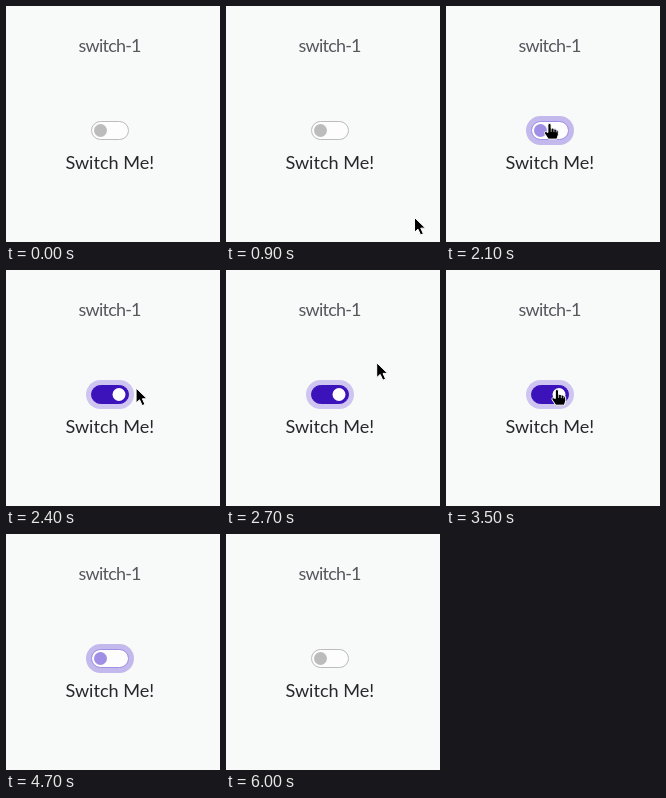
These frames come from a looping animation (214x236 px, 6600 ms). An HTML page:

```html
<!DOCTYPE html>
<html lang="en">
<head>
<meta charset="utf-8">
<title>Switch</title>
<style>
  html, body { margin: 0; width: 100%; height: 100%; overflow: hidden; background: #f8f9f9; }
  svg { display: block; width: 100vw; height: 100vh; }
  text { font-family: Lato, "Open Sans", sans-serif; }
</style>
</head>
<body>
<svg viewBox="0 0 214 236" xmlns="http://www.w3.org/2000/svg">
  <rect width="214" height="236" fill="#f8f9f9"/>
  <text x="72.6" y="45.7" font-size="18" letter-spacing="-0.78" fill="#55575d">switch-1</text>
  <text x="59.4" y="163" font-size="18.1" fill="#28282c">Switch Me!</text>

  <rect id="ring" x="80" y="110" width="48" height="29" rx="14.5"/>
  <rect id="track" x="85.5" y="115.5" width="37" height="18" rx="9"/>
  <circle id="knob" cy="124.5" r="6.5"/>

  <path id="arrow" d="M.7 .7V15.6L4.2 12.4L6.8 18.2L9.6 17L7 11.4H11.7Z"
    fill="#000" stroke="#fff" stroke-linejoin="round"/>
  <g id="hand" stroke="#fff" stroke-linejoin="round">
    <path d="M-1.6 9V1.4Q-1.6 0 0 0T1.6 1.4V5Q3.2 4 4.4 5.6Q6 4.8 6.9 6.5Q8.8 6 8.8 8.4V11.4L7.4 15.6H-1.2L-4.8 10.2Q-5.6 8.6 -4.2 8.2Q-3 8 -1.6 9Z"/>
    <path d="M1.7 5.4V8.4M4.4 6V8.6M6.8 6.8V8.8" stroke-width=".7" fill="none"/>
  </g>
</svg>
<script>
const LOOP = 6600, STEP = 100;
const PRESS = 2100, RELEASE = 4200, BLUR = 5400, FADE = 200;
const el = id => document.getElementById(id);
const ring = el('ring'), track = el('track'), knob = el('knob');
const arrow = el('arrow'), hand = el('hand');

// Each move bends from one point to the next around a control point.
const spot = (x, y) => ({ x, y });
const corner = spot(196, 217), left = spot(103.5, 117.5);
const away = spot(150, 92), right = spot(107, 124), exit = spot(200, 224);
const moves = [
  { start: 800, end: 1500, from: corner, bend: spot(120, 160), to: left },
  { start: 2100, end: 2700, from: left, bend: spot(132, 130), to: away },
  { start: 3000, end: 3700, from: away, bend: spot(114, 114), to: right },
  { start: 4300, end: 4700, from: right, bend: spot(154, 174), to: exit }
];

const GREY = [188, 188, 188], VIOLET = [160, 143, 228], INDIGO = [60, 18, 187];
const WHITE = [253, 253, 253], PALE = [207, 197, 241], LILAC = [196, 185, 236];

const mix = (a, b, k) => a + (b - a) * k;
const blend = (a, b, k) => a.map((v, i) => mix(v, b[i], k));
const rgb = c => `rgb(${c.map(Math.round)})`;
const ramp = (t, start, len) => Math.max(0, Math.min(1, (t - start) / len));
const slide = (t, start) => ramp(t, start, FADE) ** 1.5;
const smooth = k => k * k * (3 - 2 * k);

function pointer(t) {
  if (t < moves[0].start || t >= moves[3].end) return null;
  const m = moves.filter(m => m.start <= t).pop();
  const k = smooth(ramp(t, m.start, m.end - m.start));
  const curve = axis => mix(mix(m.from[axis], m.bend[axis], k), mix(m.bend[axis], m.to[axis], k), k);
  return [curve('x'), curve('y')];
}

function place(node, pos, shown) {
  node.setAttribute('display', shown ? 'inline' : 'none');
  if (shown) node.setAttribute('transform', `translate(${pos})`);
}

function draw(t) {
  const on = slide(t, PRESS) - slide(t, RELEASE);
  const fill = slide(t, PRESS) - ramp(t, RELEASE, FADE / 2);
  const focus = t < PRESS ? 0 : 1 - ramp(t, BLUR, FADE);
  const accent = blend(GREY, VIOLET, focus);

  ring.setAttribute('fill', rgb(blend(LILAC, PALE, fill)));
  ring.setAttribute('opacity', focus);
  track.setAttribute('fill', rgb(blend(WHITE, INDIGO, fill)));
  track.setAttribute('stroke', rgb(blend(accent, INDIGO, fill)));
  knob.setAttribute('cx', mix(94.5, 113, on));
  knob.setAttribute('fill', rgb(blend(accent, WHITE, fill)));

  const pos = pointer(t);
  const over = pos && Math.abs(pos[0] - 104) < 19 && Math.abs(pos[1] - 124.5) < 9.5;
  place(arrow, pos, pos && !over);
  place(hand, pos, over);
}

const begin = performance.now();
function tick() {
  const t = (performance.now() - begin) % LOOP;
  draw(Math.floor(t / STEP) * STEP);
  requestAnimationFrame(tick);
}
tick();
</script>
</body>
</html>
```
